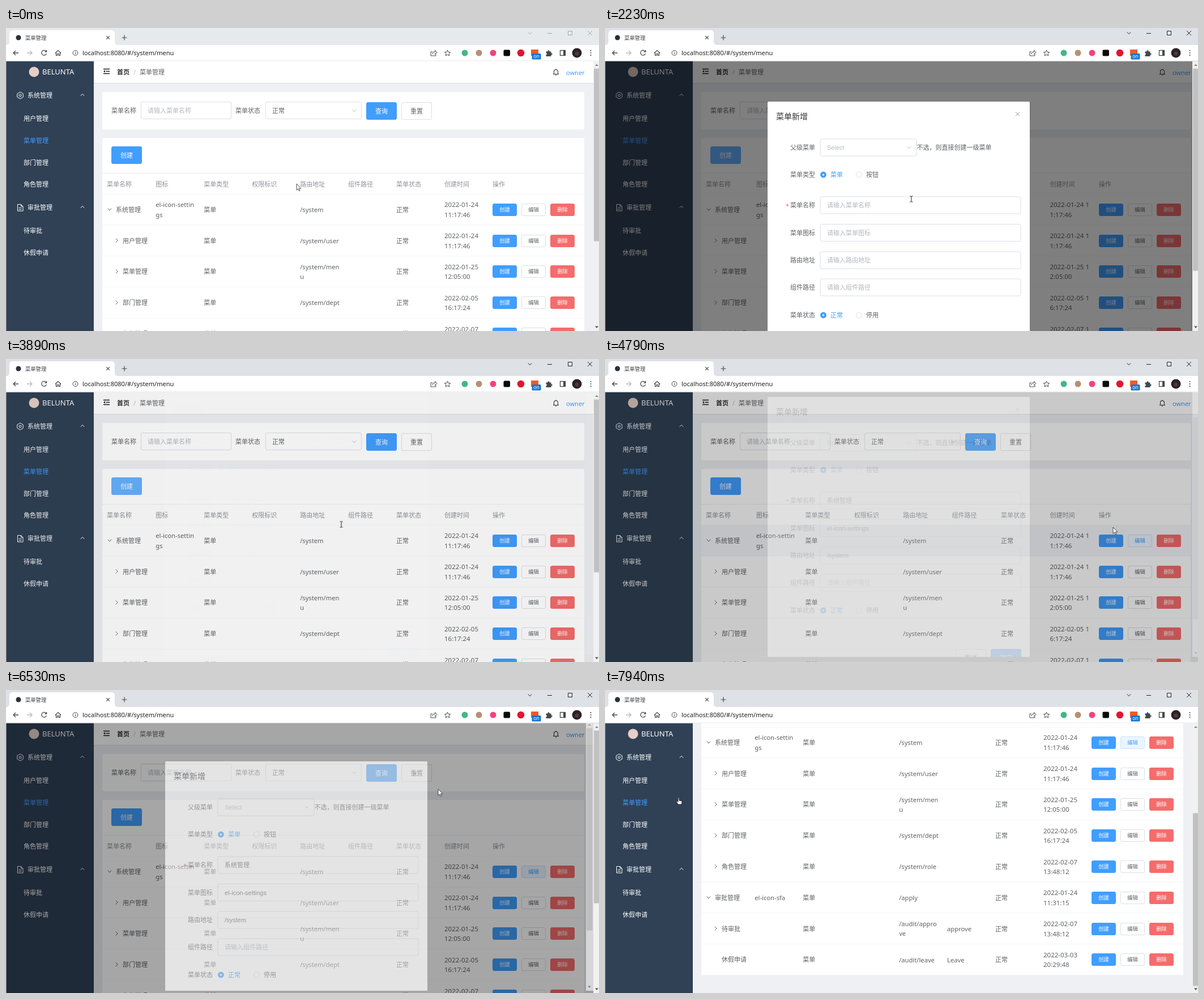
Animation, 1047 px wide and 535 px high, one loop 8 s. Source, as an HTML page:

```html
<!DOCTYPE html>
<html lang="zh-CN">
<head>
<meta charset="utf-8">
<title>菜单管理</title>
<style>
html, body { margin: 0; width: 100%; height: 100%; overflow: hidden; background: #fff; }
svg { display: block; width: 1047px; height: 535px; font-family: "Noto Sans", "Noto Sans CJK SC", "Noto Sans CJK", sans-serif; }
.arial { font-family: "Liberation Sans", "Noto Sans CJK SC", "Noto Sans CJK", sans-serif; }
text { white-space: pre; }
.row { fill: #fff; }
.row.hover { fill: #f5f7fa; }
.create rect { fill: #409eff; stroke: #409eff; }
.create.focus rect { fill: #66b1ff; stroke: #66b1ff; }
.edit.focus rect { fill: #ecf5ff; stroke: #c6e2ff; }
.edit.focus text { fill: #409eff; }
</style>
</head>
<body>
<svg id="stage" viewBox="0 0 1047 535"></svg>
<script>
const BLUE = '#409eff', RED = '#f56c6c', TEXT = '#606266', MUTED = '#909399', HINT = '#b4b8bf', BORDER = '#dcdfe6';
const TOP = 58.5, VIEW = 476.5, PAGE_MAX = 228, DIALOG_MAX = 125, LOOP = 8000;

// Drawing helpers, all in stage coordinates; text is placed by its vertical centre.
const text = (x, y, s, fill = TEXT, size = 11, attrs = '') =>
  `<text x="${x}" y="${y + size * .37}" font-size="${size}" fill="${fill}" ${attrs}>${s}</text>`;
const rect = (x, y, w, h, fill, attrs = '') =>
  `<rect x="${x}" y="${y}" width="${w}" height="${h}" fill="${fill}" ${attrs}/>`;
const line = (d, color, width = 1, fill = 'none') =>
  `<path d="${d}" stroke="${color}" stroke-width="${width}" fill="${fill}"/>`;
const dot = (x, y, r, fill, attrs = '') => `<circle cx="${x}" cy="${y}" r="${r}" fill="${fill}" ${attrs}/>`;
const box = (x, y, w, h, fill = '#fff', stroke = BORDER) =>
  rect(x + .5, y + .5, w - 1, h - 1, fill, `rx="2.5" stroke="${stroke}"`);
const button = (x, y, w, h, label, fill, size = 11) =>
  box(x, y, w, h, fill || '#fff', fill || BORDER) +
  text(x + w / 2, y + h / 2, label, fill ? '#fff' : TEXT, size, 'text-anchor="middle"');
const group = (attrs, content) => `<g ${attrs}>${content}</g>`;
const chevron = (x, y, dir, color) => line({
  up: `M${x - 3.2} ${y + 1.7}l3.2-3.3 3.2 3.3`,
  down: `M${x - 3.2} ${y - 1.6}l3.2 3.3 3.2-3.3`,
  right: `M${x - 1.7} ${y - 3.4}l3.4 3.4-3.4 3.4`
}[dir], color);
const cross = (x, y, r, color, width = 1) =>
  line(`M${x - r} ${y - r}l${2 * r} ${2 * r}M${x + r} ${y - r}l${-2 * r} ${2 * r}`, color, width);

function browser() {
  const ink = '#45484c';
  const controls = chevron(925, 9, 'down', 'currentColor') + line('M956 9.5h8M992.5 5.5h7v7h-7z', 'currentColor') +
    cross(1031, 9, 4, 'currentColor');
  return rect(0, 0, 1047, 31, '#e7eaed', 'id="strip"') +
    line('M0 30Q6 30 6 24V10Q6 4 12 4H186Q192 4 192 10V24Q192 30 198 30Z', 'none', 0, '#fff') +
    dot(22, 17, 4.5, '#27303d') + text(34, 17.5, '菜单管理', '#3c4043', 9.3) +
    cross(180, 17, 2.8, ink, 1.2) + line('M204.5 17h9M209 12.5v9', ink, 1.2) +
    group('id="controls" color="#a4a7aa"', controls) +
    rect(0, 30, 1047, 29, '#fff') + rect(0, 57.5, 1047, 1, '#e3e5e8') +
    line('M22 44h-9M17 40l-4 4 4 4', ink, 1.3) + line('M37 44h9M42 40l4 4-4 4', '#bbb', 1.3) +
    line('M71 41.5a4.4 4.4 0 1 0 .4 3.6M71.6 39v3.2h-3.2', ink, 1.3) +
    line('M87 44.3l5-4.8 5 4.8M88.5 43.5v5h2.3v-3h2.4v3h2.3v-5', ink, 1.2) +
    dot(122.5, 44, 4.4, 'none', `stroke="${ink}"`) + line('M122.5 43.3v3M122.5 41.3v1', ink) +
    text(135, 44, 'localhost:8080/#/system/menu', '#202124', 11.05) +
    line('M753 42h-3v7h9v-2.5M752.5 46q.5-4 5-4v-2.5l3.5 3.7-3.5 3.6v-2.3', ink) +
    line('M779.5 39l1.5 3.5 3.7.3-2.8 2.5.9 3.7-3.3-2-3.3 2 .9-3.7-2.8-2.5 3.7-.3z', ink) +
    dot(810, 44, 5.5, '#41b883') + dot(835, 44, 5.5, '#b78f72') + dot(860, 44, 5.5, '#f5427f') +
    rect(878.5, 38.5, 11.5, 11, '#0b0b0b', 'rx="2"') + dot(909, 44, 6.3, '#e0162f') +
    rect(927, 38, 13, 11, '#ee5b2c') + rect(928.5, 45, 16, 10.5, '#1976d2', 'rx="1.5"') +
    text(936.5, 49.6, 'on', '#fff', 8.5, 'text-anchor="middle"') +
    line('M953.5 41.5h3a1.6 1.6 0 1 1 3 0h3v3a1.6 1.6 0 1 1 0 3v2.5h-9v-2.7a1.5 1.5 0 0 0 0-3z', 'none', 0, ink) +
    rect(978.5, 39.5, 9, 9, '#fff', `stroke="${ink}" stroke-width="1.3"`) + rect(984, 39, 4, 10, ink) +
    dot(1008, 44, 8.5, '#2a2326') + dot(1008, 45, 3.5, '#51383a') +
    [40, 44, 48].map(y => dot(1032.5, y, 1.1, ink)).join('');
}

function sidebar() {
  const items = [['用户管理', 160], ['菜单管理', 198.5], ['部门管理', 237.5], ['角色管理', 275.5], ['待审批', 358], ['休假申请', 396.5]];
  return rect(0, TOP, 1, VIEW, '#7b7f84') + rect(1, TOP, 154, VIEW, '#304156') +
    dot(49.5, 77.5, 9, '#e6cfc6') + text(64, 77.5, 'BELUNTA', '#fff', 13) +
    line('M25 113l5.2 3v6l-5.2 3-5.2-3v-6z', '#fff') + dot(25, 119, 2, 'none', 'stroke="#fff"') +
    line('M20.5 311.5h6l3.5 3.5v8h-9.5zM26.5 311.5v3.5h3.5M22.5 317.5h5M22.5 320.3h5', '#fff') +
    [['系统管理', 119], ['审批管理', 317]].map(([s, y]) => text(38, y, s, '#fff') + chevron(135, y - 1, 'up', '#fff')).join('') +
    items.map(([s, y]) => text(31, y, s, s === '菜单管理' ? BLUE : '#fff')).join('');
}

// name, depth, icon, route, component, date, time
const ROWS = [
  ['系统管理', 0, 'el-icon-settin|gs', '/system', '', '2022-01-24', '11:17:46'],
  ['用户管理', 1, '', '/system/user', '', '2022-01-24', '11:17:46'],
  ['菜单管理', 1, '', '/system/men|u', '', '2022-01-25', '12:05:00'],
  ['部门管理', 1, '', '/system/dept', '', '2022-02-05', '16:17:24'],
  ['角色管理', 1, '', '/system/role', '', '2022-02-07', '13:48:12'],
  ['审批管理', 0, 'el-icon-sfa', '/apply', '', '2022-01-24', '11:31:15'],
  ['待审批', 1, '', '/audit/appro|ve', 'approve', '2022-02-07', '13:48:12'],
  ['休假申请', 2, '', '/audit/leave', 'Leave', '2022-03-03', '20:29:48']
];
const HEADS = ['菜单名称', '图标', '菜单类型', '权限标识', '路由地址', '组件路径', '菜单状态', '创建时间', '操作'];

function page(wide) {
  const extra = wide ? 13 : 0, width = 851 + extra, pitch = 54.8;
  const col = i => i === 0 ? 178 : wide ? 267 + 86.4 * (i - 1) : 264.3 + 84.95 * (i - 1);
  const cell = (i, y, value, size = 11.2) => {
    const lines = value.split('|');
    return lines.map((s, n) => text(col(i), y + (n - (lines.length - 1) / 2) * 17.5, s, TEXT, size)).join('');
  };
  const row = ([name, depth, icon, route, part, date, time], i) => {
    const y = 320.8 + pitch * i, top = y - pitch / 2;
    const x = Math.round(col(8)), buttonTop = Math.round(y - 11);
    const stamp = wide ? `${date} ${time[0]}|${time.slice(1)}` : `${date}|${time}`;
    return rect(170, top, width, pitch, '', `class="row" data-row="${i}"`) +
      rect(170, Math.round(top + pitch) - .5, width, 1, '#ebeef5') +
      (depth < 2 ? chevron(depth ? 195.5 : 183, y - .5, depth ? 'right' : 'down', TEXT) : '') +
      text(depth ? 206 : 194, y, name) + cell(1, y, icon) + cell(2, y, '菜单', 11) + cell(4, y, route) +
      cell(5, y, part) + cell(6, y, '正常', 11) + cell(7, y, stamp, 11.5) +
      button(x, buttonTop, 43, 22, '创建', BLUE, 9.3) +
      group(i ? '' : 'class="edit"', button(x + 51, buttonTop, 43, 22, '编辑', '', 9.3)) +
      button(x + 102, buttonTop, 43, 22, '删除', RED, 9.3);
  };
  return rect(155, TOP, 895, 705, '#eef0f4') +
    rect(155, TOP, 895, 39, '#fff') + rect(155, 97, 895, 1, '#d8dce5') +
    line('M172 72.5h11M176.5 76.5h6.5M172 80.5h11', '#1c1c1c', 1.6) + line('M175 74.3v4.4l-3-2.2z', 'none', 0, '#1c1c1c') +
    text(196, 78, '首页', '#303133', 11, 'font-weight="700"') + text(225, 78, '/', HINT) + text(236, 78, '菜单管理') +
    group(`transform="translate(${extra})"`,
      line('M966 81.5h10M967.5 81.5v-4.5a3.5 3.5 0 0 1 7 0v4.5M969.8 83.3h2.4M971 72v1.5', '#303133', 1.1) +
      text(989, 78.5, 'owner', BLUE)) +
    rect(170, 113, width, 66, '#fff', 'rx="3"') +
    text(186, 146, '菜单名称') + box(238, 130, 160, 31) + text(250, 146, '请输入菜单名称', HINT) +
    text(405, 146, '菜单状态') + box(458, 130, 170, 31) + text(470, 146, '正常') + chevron(615, 146, 'down', HINT) +
    button(636, 131, 54, 31, '查询', BLUE) + button(698, 131, 54, 31, '重置') +
    rect(170, 194, width, 537.5, '#fff', 'rx="3"') +
    group('class="create"', button(186, 209, 54, 31, '创建', BLUE)) +
    rect(170, 256, width, 1, '#ebeef5') + rect(170, 293, width, 1, '#ebeef5') +
    HEADS.map((s, i) => text(col(i), 275.5, s, MUTED)).join('') + ROWS.map(row).join('');
}

function dialog() {
  const arial = 'class="arial"';
  const label = (y, s) => text(371, y, s, TEXT, 11, 'text-anchor="end"');
  const radios = (y, a, b) =>
    dot(385.5, y, 5.4, BLUE) + dot(385.5, y, 1.7, '#fff') + text(398, y, a, BLUE) +
    dot(448.5, y, 5, '#fff', `stroke="${BORDER}"`) + text(461, y, b);
  const fields = [['菜单名称', 313, '系统管理'], ['菜单图标', 361.5, 'el-icon-settings'], ['路由地址', 410, '/system'], ['组件路径', 458, '']];
  const field = ([name, y, value]) => label(y, name) + box(379.5, y - 15.5, 355, 31) + (value
    ? text(392, y, '请输入' + name, HINT, 11, 'class="arial empty"') + text(392, y, value, TEXT, 11, 'class="arial filled"')
    : text(392, y, '请输入' + name, HINT, 11, arial));
  return rect(286.5, 130, 464, 492, '#000', 'opacity=".12" rx="2"') + rect(287, 130, 463, 491, '#fff', 'rx="2"') +
    text(302, 155.5, '菜单新增', '#303133', 14) + cross(728.5, 152, 3.6, MUTED) +
    label(211, '父级菜单') + box(379.5, 195.5, 171, 31) + text(392, 211, 'Select', HINT, 11, arial) +
    chevron(537, 211, 'down', HINT) + text(550.5, 211, '不选，则直接创建一级菜单') +
    label(259, '菜单类型') + radios(259, '菜单', '按钮') +
    text(319, 314, '*', RED) + fields.map(field).join('') +
    label(507, '菜单状态') + radios(507, '正常', '停用') +
    button(619, 575, 54, 31, '取消') + button(681, 575, 54, 31, '确定', BLUE);
}

const scrollbar = (id, max) => group(`id="${id}"`,
  rect(1037, TOP, 13, VIEW, '#f1f1f1') +
  line('M1040 67l3-3.5 3 3.5z', 'none', 0, '#8b8b8b') + line('M1040 526.5l3 3.5 3-3.5z', 'none', 0, '#505050') +
  rect(1038, 71.5, 10.5, 451 * VIEW / (VIEW + max), '#c1c1c1', 'class="thumb"'));

const POINTERS = {
  arrow: line('M0 0V11.3l2.6-2.4 1.8 3.9 1.7-.8-1.8-3.8H7.8Z', '#222', .8, '#fff'),
  beam: line('M-2.5-5h2l.5.5.5-.5h2M0-4.5v9M-2.5 5h2l.5-.5.5.5h2', '#222', 1),
  hand: line('M-2 6L-4.5 1.5q-.8-1.7 1-1.5l1.5 1.5V-5.5q1-1.7 2 0V-1l4 1q1 .3 1 1.5L4 6Z', '#222', .9, '#fff')
};

const stage = document.getElementById('stage');
stage.innerHTML =
  `<clipPath id="clip"><rect y="${TOP}" width="1050" height="${VIEW}"/></clipPath>` + browser() +
  group('clip-path="url(#clip)"',
    group('id="narrow"', page(false)) + group('id="wide"', page(true)) + sidebar() +
    group('id="overlay"', rect(1, TOP, 1049, VIEW, '#000', 'opacity=".5"') +
      group('id="layer"', group('clip-path="url(#clip)"', group('id="dialog"', dialog()) + scrollbar('dialogBar', DIALOG_MAX)))) +
    scrollbar('pageBar', PAGE_MAX)) +
  group('id="pointer"', Object.entries(POINTERS).map(([k, d]) => group(`id="${k}"`, d)).join(''));

const BURSTS = [[570, 1110, 5], [1420, 2380, 8], [2530, 3500, 8], [3650, 4670, 9], [4790, 5750, 8], [5870, 6800, 8], [6920, 7940, 9]];
function snap(t) {
  const burst = BURSTS.filter(b => b[0] <= t).pop();
  if (!burst) return 0;
  const [a, b, n] = burst;
  return a + Math.min(n - 1, Math.floor((t - a) / (b - a) * (n - 1) + .15)) * (b - a) / (n - 1);
}

// Each track lists [time, value...]
const CURSOR = [[570, 513, 275], [1110, 492, 279], [1420, 492, 279], [1694, 214, 222], [1900, 214, 222], [2243, 541, 302],
  [2530, 541, 302], [2800, 592, 292], [3905, 592, 292], [4160, 780, 305], [4415, 932, 318], [4660, 932, 318], [4790, 897, 297],
  [5200, 640, 300], [5870, 640, 300], [6350, 763, 175], [6920, 763, 175], [7400, 740, 200], [7940, 131, 196]];
const KIND = [[0, 'arrow'], [1690, 'hand'], [1960, 'arrow'], [2100, 'beam'], [4030, 'arrow'], [4400, 'hand'], [4780, 'arrow'],
  [5190, 'beam'], [6000, 'arrow'], [7930, 'hand']];
const PAGE_SCROLL = [[433, 0], [705, 156], [840, 228], [975, 110], [1110, 0], [6785, 0], [7300, 228]];
const DIALOG_SCROLL = [[2393, 0], [2800, 125], [3080, 125], [3360, 54], [5064, 54], [5480, 0]];
const FADE = [[1831, 0], [1968, .42], [2105, .9], [2243, 1], [3600, 1], [3650, .93], [3778, .5], [3905, .12], [4033, 0],
  [4670, 0], [4790, .42], [4927, .9], [5064, 1], [6401, 1], [6534, .7], [6667, .2], [6800, 0]];
const HOVER = [[0, -1], [830, 3], [1420, -1], [4150, 0], [4920, -1], [7180, 1], [7420, -1]];

function mix(track, t, i = 1) {
  const n = track.findIndex(k => k[0] > t);
  if (n === 0) return track[0][i];
  if (n < 0) return track[track.length - 1][i];
  const a = track[n - 1], b = track[n];
  return a[i] + (b[i] - a[i]) * (t - a[0]) / (b[0] - a[0]);
}
const pick = (track, t) => track.filter(k => k[0] <= t).pop()[1];
const $ = id => document.getElementById(id);
const show = (el, on) => el.setAttribute('display', on ? 'inline' : 'none');
const move = (el, x, y) => el.setAttribute('transform', `translate(${x} ${y})`);
const each = (selector, fn) => stage.querySelectorAll(selector).forEach(fn);

function setThumb(bar, scroll, max) {
  move(bar.querySelector('.thumb'), 0, scroll * 451 / (VIEW + max));
}

function draw(t) {
  const fade = mix(FADE, t), scroll = Math.round(mix(PAGE_SCROLL, t)), inner = Math.round(mix(DIALOG_SCROLL, t));
  const locked = t >= 1960 && t < 3640 || t >= 4780 && t < 6450;
  const active = t >= 1690, editing = t >= 4400, row = pick(HOVER, t), kind = pick(KIND, t);

  $('strip').setAttribute('fill', active ? '#dee1e6' : '#e7eaed');
  $('controls').setAttribute('color', active ? '#222' : '#a4a7aa');
  show($('narrow'), !locked);
  show($('wide'), locked);
  show($('pageBar'), !locked);
  move($('narrow'), 0, -scroll);
  move($('wide'), 0, -scroll);
  setThumb($('pageBar'), scroll, PAGE_MAX);

  show($('overlay'), fade > 0);
  $('overlay').setAttribute('opacity', fade);
  $('layer').setAttribute('opacity', fade);
  move($('layer'), 0, -Math.floor(15.6 * (1 - fade)));
  move($('dialog'), locked ? 0 : -6, -inner);
  move($('dialogBar'), locked ? 0 : -13, 0);
  setThumb($('dialogBar'), inner, DIALOG_MAX);

  each('.empty', el => show(el, !editing));
  each('.filled', el => show(el, editing));
  each('.row', el => el.classList.toggle('hover', +el.dataset.row === row));
  each('.create', el => el.classList.toggle('focus', active && !editing));
  each('.edit', el => el.classList.toggle('focus', editing));

  move($('pointer'), mix(CURSOR, t), mix(CURSOR, t, 2));
  for (const k in POINTERS) show($(k), k === kind);
}

let last = -1;
const start = performance.now();
function tick() {
  const t = snap((performance.now() - start) % LOOP);
  if (t !== last) draw(last = t);
  requestAnimationFrame(tick);
}
tick();
</script>
</body>
</html>
```
